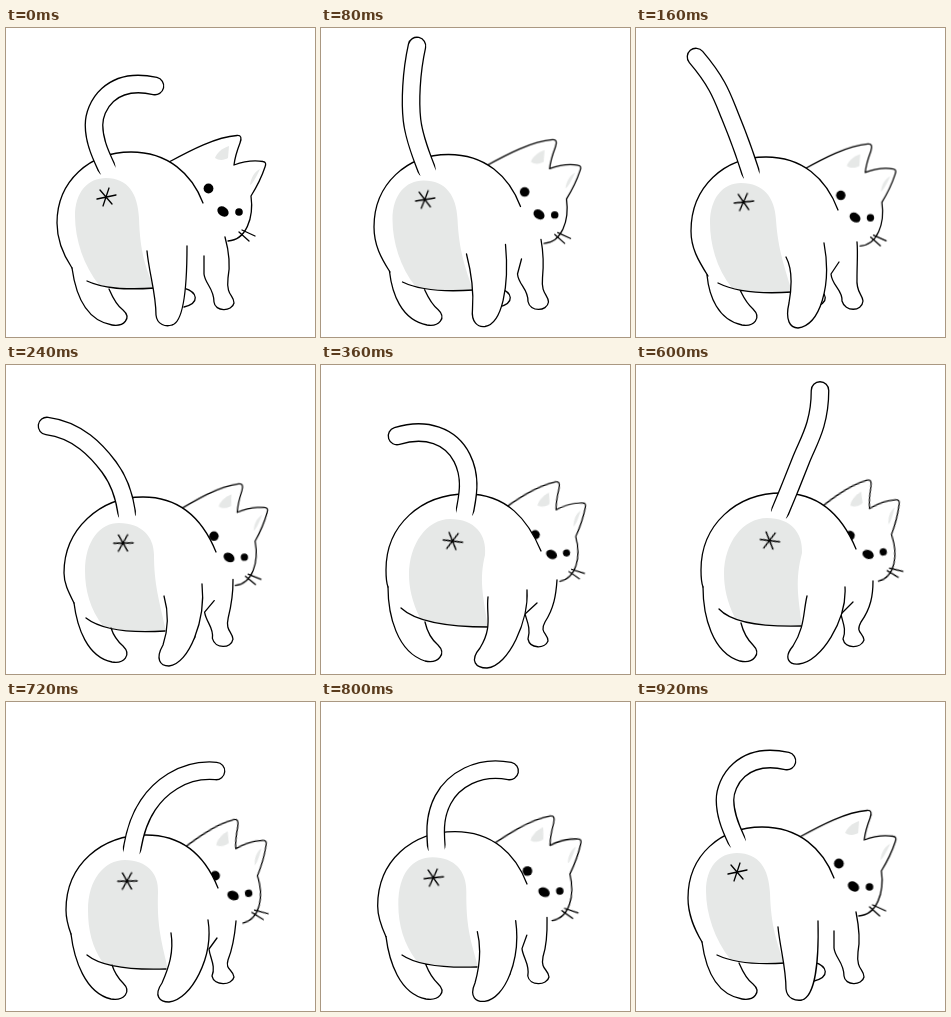
An HTML page without scripts for the animation above (0.96 s loop, 309 px wide and 309 px high).

```html
<!DOCTYPE html>
<html lang="en">
<head>
<meta charset="utf-8">
<title>Cat walking away</title>
<style>
html, body { margin: 0; height: 100%; overflow: hidden; background: #fff; }
svg { display: block; width: 100%; height: 100%; }
svg * { animation: 960ms steps(2) infinite; }
.line { fill: none; stroke: #000; stroke-width: 1.3; stroke-linecap: round; stroke-linejoin: round; }
.solid { fill: #fff; }
.grey { fill: #e6e8e7; }
.tail { animation-name: tail; fill: none; stroke-linecap: round; }
.tail-edge { stroke: #000; stroke-width: 18.8; stroke-dasharray: 91 20; stroke-dashoffset: 100; }
.tail-fill { stroke: #fff; stroke-width: 16.2; }
.body { animation-name: body; }
.patch { animation-name: patch; }
.hind-left { animation-name: hind-left; }
.hind-right { animation-name: hind-right; }
.front { animation-name: front; }
.head { animation-name: head; transform-origin: 217px 183px; }
.star { animation-name: star; transform-origin: 100px 169px; }

/* The picture steps every 40 ms; steps(n) divides each gap accordingly. */
@keyframes tail {
  0%, 100% { d: path("M107 153C96 130 88 115 88 97S104 48 149 58"); }
  8.333% { d: path("M111 155C101 130 93 110 91 92S90 45 96 18"); }
  16.666% { d: path("M119 159C110 128 101 105 94 88S83 56 60 29"); }
  25% { d: path("M122 163C121 138 115 118 103 102S72 65 41 61"); animation-timing-function: steps(3); }
  37.5% { d: path("M141 160C146 135 152 115 141 93S105 62 76 71"); }
  45.833% { d: path("M145 157C156 130 166 110 155 83S120 50 99 54"); }
  54.166% { d: path("M143 157C154 130 164 110 161 85S152 40 136 25"); }
  62.5% { d: path("M138 161C150 133 158 113 165 95S184 60 184 25.5"); animation-timing-function: steps(3); }
  75% { d: path("M124 162C127 135 132 118 142 103S175 66 210 69"); animation-timing-function: steps(3); }
  87.5% { d: path("M113 157C108 134 102 116 112 95S148 61 178 69"); }
  95.833% { d: path("M107 152C97 131 89 116 89 98S106 49 151 59"); }
}
@keyframes body {
  0%, 100% { d: path("M66 240C58 228 51 214 51 195C51 153 84 124 125 124C162 124 186 146 197 175"); }
  16.666% { d: path("M72 248C62 232 55 220 55 203C55 159 88 129 130 129C166 129 190 150 202 182"); }
  25% { d: path("M68 238C62 226 58 218 58 208C58 164 94 132 137 132C174 132 197 155 210 187"); animation-timing-function: steps(3); }
  37.5% { d: path("M67 222C65 217 65 211 65 205C65 160 100 129 146 129C186 129 207 155 220 186"); }
  45.833% { d: path("M71 218C69 212 68 207 68 200C68 156 104 124 149 124C190 124 212 150 223 181"); }
  54.166% { d: path("M70 219C68 213 67 207 67 201C67 157 103 125 148 125C189 125 211 151 223 181"); }
  62.5% { d: path("M67 222C65 217 65 211 65 205C65 160 100 128 146 128C186 128 208 155 220 184"); animation-timing-function: steps(3); }
  75% { d: path("M65 232C62 224 60 216 60 208C60 162 96 133 140 133C178 133 200 156 212 186"); animation-timing-function: steps(3); }
  87.5% { d: path("M65 236C60 226 55 216 55 202C55 157 89 128 131 128C168 128 192 150 203 180"); }
  95.833% { d: path("M66 240C59 228 52 214 52 196C52 153 85 125 126 125C163 125 187 147 198 176"); }
}
@keyframes patch {
  0%, 100% { d: path("M93 257C78 238 69 212 69 188C69 164 82 150 100 150C122 150 132 166 133 190C134 225 140 240 148 260Q120 263 93 257"); }
  16.666% { d: path("M96 260C80 240 74 215 74 195C74 170 87 155 105 155C128 155 139 170 140 192C142 222 149 240 156 264Q122 267 96 260"); }
  25% { d: path("M97 261C84 244 79 225 79 206C79 176 94 158 113 158C136 158 148 172 148 190C148 218 153 235 160 266Q128 269 97 261"); animation-timing-function: steps(3); }
  37.5% { d: path("M99 253C91 237 88 222 88 210C88 179 106 154 129 154C154 154 166 170 164 190C158 215 162 230 167 262Q130 263 99 253"); }
  45.833% { d: path("M103 250C95 236 92 222 92 208C92 174 111 150 135 150C160 150 172 168 171 186C164 210 164 235 168 257Q138 258 103 250"); }
  54.166% { d: path("M102 250C95 236 91 222 91 208C91 175 110 150 134 150C159 150 172 168 170 186C163 210 164 235 167 258Q140 259 102 250"); }
  62.5% { d: path("M99 253C91 237 88 222 88 209C88 178 107 153 131 153C155 153 167 168 166 188C159 215 162 230 166 261Q130 263 99 253"); animation-timing-function: steps(3); }
  75% { d: path("M97 261C86 245 82 228 82 208C82 178 98 158 119 158C141 158 153 172 152 190C151 220 154 235 162 267Q128 269 97 261"); animation-timing-function: steps(3); }
  87.5% { d: path("M95 258C81 240 75 220 75 200C75 168 88 154 108 154C130 154 142 168 142 190C142 222 146 238 155 264Q122 266 95 258"); }
  95.833% { d: path("M94 257C79 238 70 212 70 189C70 165 83 151 101 151C123 151 133 167 134 191C135 225 141 240 148 261Q120 264 94 257"); }
}
/* Outer leg, paw, then the belly line. */
@keyframes hind-left {
  0%, 100% { d: path("M66 240C69 262 78 292 106 297C118 299 126 290 117 282C110 277 106 268 103 261M81 253C98 261 120 262 149 260"); }
  16.666% { d: path("M71 247C73 268 82 292 106 297C118 299 126 290 117 281C110 275 107 268 104 262M82 255C102 265 128 266 156 264"); }
  25% { d: path("M68 238C71 262 81 292 106 297C118 299 126 290 117 281C110 275 107 269 105 263M80 253C97 266 128 268 159 266"); animation-timing-function: steps(3); }
  37.5% { d: path("M67 222C67 250 76 287 104 296C117 299 126 289 117 280C110 274 106 266 104 257M80 243C95 257 130 262 168 262"); }
  45.833% { d: path("M71 218C71 248 78 289 104 296C116 299 126 290 118 280C112 272 110 262 109 252M86 240C100 254 136 257 167 258"); }
  54.166% { d: path("M70 219C70 248 78 289 104 296C116 299 126 290 118 280C112 272 109 263 108 254M85 241C99 255 135 259 167 259"); }
  62.5% { d: path("M67 222C67 250 76 288 104 296C117 299 126 289 117 280C110 273 107 266 105 258M83 244C96 258 130 262 166 261"); animation-timing-function: steps(3); }
  75% { d: path("M65 232C68 257 79 291 105 297C118 299 126 290 117 281C111 275 108 269 106 263M81 253C97 266 130 268 160 267"); animation-timing-function: steps(3); }
  87.5% { d: path("M65 236C68 260 78 292 105 297C118 299 126 290 117 282C110 276 107 269 104 262M81 253C97 263 125 265 154 264"); }
  95.833% { d: path("M66 240C69 262 78 292 106 297C118 299 126 290 117 282C110 277 106 268 103 261M81 253C98 261 120 263 149 261"); }
}
@keyframes hind-right {
  0%, 100% { d: path("M141 223C143 245 150 265 150 287C151 297 160 299 166 297C178 294 181 260 181 218"); }
  16.666% { d: path("M150 229C157 242 156 258 153 275C149 292 154 300 162 300C184 297 196 258 188 215"); }
  25% { d: path("M158 231C162 245 163 262 157 280C149 294 154 301 163 301C183 299 200 255 196 219"); animation-timing-function: steps(3); }
  37.5% { d: path("M167 232C165 250 172 262 159 283C148 296 155 303 166 303C188 301 208 255 206 225"); }
  45.833% { d: path("M171 229C169 250 168 262 157 281C147 293 152 300 163 300C186 298 213 260 210 225"); }
  54.166% { d: path("M172 229C168 249 168 262 157 281C147 293 152 300 163 300C186 298 213 258 210 223"); }
  62.5% { d: path("M171 231C167 248 169 262 157 281C147 293 153 300 163 299C185 297 211 255 209 222"); animation-timing-function: steps(3); }
  75% { d: path("M165 231C168 250 163 265 156 281C147 294 154 300 163 300C185 298 208 255 202 218"); animation-timing-function: steps(3); }
  87.5% { d: path("M152 229C157 246 157 262 153 281C148 296 156 300 164 299C184 296 196 258 191 219"); }
  95.833% { d: path("M142 225C144 246 150 265 150 287C151 297 160 299 166 298C179 294 183 260 182 219"); }
}
@keyframes front {
  0%, 100% { d: path("M198 228L198 246C199 256 208 260 208 274C209 284 226 284 228 275C228 267 220 268 222 250C225 235 222 220 219 209"); animation-timing-function: steps(4); }
  16.666% { d: path("M203 234L195 246C196 258 207 262 206 273C209 284 226 284 227 273C226 265 220 265 221 250C221 235 222 225 221 214"); animation-timing-function: steps(5); }
  37.5% { d: path("M216 238L204 249C206 256 210 264 207 274C209 284 224 284 227 276C227 268 218 268 224 257C233 243 235 230 236 215"); }
  45.833% { d: path("M220 236L208 247C208 256 211 264 207 273C209 284 225 284 228 275C227 267 219 268 225 257C236 243 240 230 239 212"); animation-timing-function: steps(4); }
  62.5% { d: path("M217 237L205 249C206 256 211 264 207 274C209 284 225 284 228 275C227 267 219 268 225 257C235 243 237 230 237 216"); animation-timing-function: steps(3); }
  75% { d: path("M211 236L203 247C204 256 210 264 206 274C208 284 226 284 228 275C227 267 219 268 222 258C228 243 229 230 230 219"); animation-timing-function: steps(5); }
  95.833% { d: path("M198 229L198 246C199 256 208 260 208 274C209 284 226 284 228 275C228 267 220 268 222 250C225 235 222 220 220 210"); }
}
@keyframes head {
  0%, 100% { transform: translate(0, 0) rotate(0deg) scale(1); }
  16.666% { transform: translate(2px, 6px) rotate(-.5deg) scale(.965); }
  25% { transform: translate(6px, 9px) rotate(-3deg) scale(.96); animation-timing-function: steps(3); }
  37.5% { transform: translate(13.5px, 6px) rotate(-7.5deg) scale(.94); }
  45.833% { transform: translate(17.5px, 2px) rotate(-10.5deg) scale(.95); }
  54.166% { transform: translate(18px, 2px) rotate(-11.5deg) scale(.95); }
  62.5% { transform: translate(15px, 6px) rotate(-11.5deg) scale(.96); animation-timing-function: steps(3); }
  75% { transform: translate(10px, 10px) rotate(-10deg) scale(.98); animation-timing-function: steps(3); }
  87.5% { transform: translate(4px, 5px) rotate(-4deg) scale(.99); }
  95.833% { transform: translate(.5px, 1px) rotate(-.3deg) scale(1); }
}
@keyframes star {
  0%, 100% { transform: none; }
  16.666% { transform: translate(7.5px, 5px) rotate(6deg); }
  25% { transform: translate(17px, 9px) rotate(11deg); animation-timing-function: steps(3); }
  37.5% { transform: translate(31.5px, 7px) rotate(19deg); }
  45.833% { transform: translate(38px, 3px) rotate(22deg); }
  54.166% { transform: translate(38px, 3px) rotate(22deg); }
  62.5% { transform: translate(33.5px, 6.5px) rotate(19deg); animation-timing-function: steps(3); }
  75% { transform: translate(21px, 10px) rotate(11deg); animation-timing-function: steps(3); }
  87.5% { transform: translate(8px, 5px) rotate(4deg); }
  95.833% { transform: translate(1px, 1px); }
}
</style>
</head>
<body>
<svg viewBox="0 0 309 309">
  <path class="line" d="M178 260C192 264 194 275 178 279"/>
  <path class="line front"/>
  <g class="head">
    <path class="grey" d="M223 118C216 120 210 126 209 130C213 133 219 132 222 130Z"/>
    <path class="grey" d="M254 141C248 144 245 150 244 157Q247 156 254 141"/>
    <path class="line" d="M163 134C185 122 210 109 231 107.5Q237 107 234 115Q229 128 228 137C236 134 248 132 257 133.500Q261 134 259 139C256 148 250 160 245 168C248 190 240 212 222 213"/>
    <circle cx="202.5" cy="160.5" r="4.9"/>
    <circle cx="233" cy="184" r="3.8"/>
    <ellipse cx="217" cy="183.5" rx="6.1" ry="4.6" transform="rotate(35 217 183.5)"/>
    <path class="line" d="M233 204L243 213M236 202L249 208"/>
  </g>
  <path class="line solid body"/>
  <path class="tail tail-edge" pathLength="100"/>
  <path class="tail tail-fill"/>
  <path class="grey patch"/>
  <path class="line star" d="M91 171L110 167M94 162L106 176M103 160L97 178"/>
  <path class="line hind-left"/>
  <path class="line solid hind-right"/>
</svg>
</body>
</html>
```
